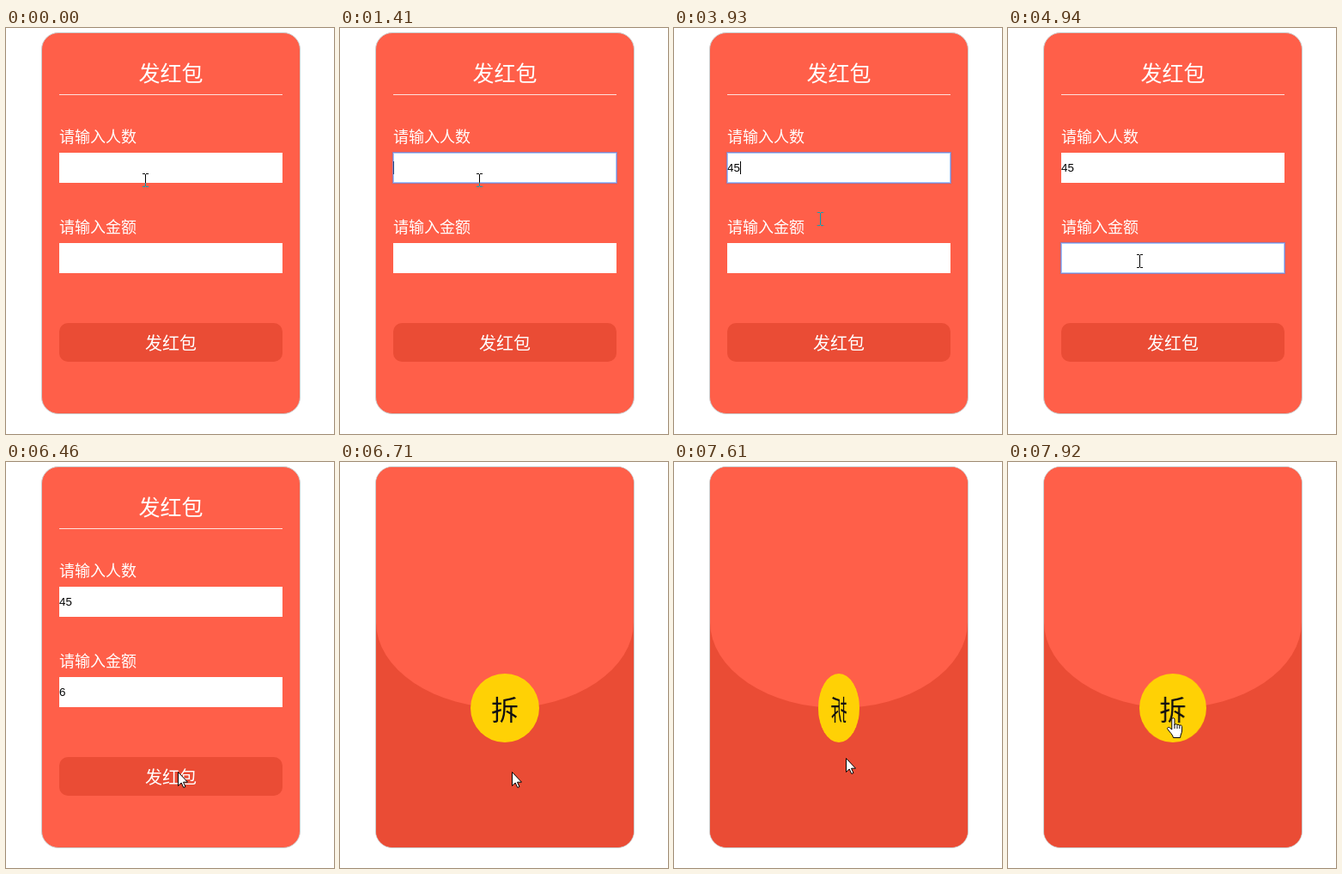
An HTML page for the animation above (8 s loop, 382x472 px).

```html
<!DOCTYPE html>
<html lang="zh-CN">
<head>
<meta charset="utf-8">
<title>发红包</title>
<style>
  :root { --red: #ff5f49; --dark: #ea4c35; }
  html, body { margin: 0; width: 100%; height: 100%; overflow: hidden; background: #fff; }
  .stage {
    position: relative; width: 382px; height: 472px; overflow: hidden; background: #fff;
    color: #fff; font-family: "Noto Sans CJK SC", "Noto Sans CJK", sans-serif;
  }
  .stage * { position: absolute; box-sizing: border-box; }
  .card {
    left: 41px; top: 5px; width: 302px; height: 444px; overflow: hidden;
    border: 1px solid #ccc; border-radius: 20px; background: var(--red);
  }
  .row { left: 20px; width: 260px; white-space: nowrap; }
  .title { top: 19px; height: 53px; border-bottom: 1px solid #ffe0dc; font-size: 25px; line-height: 52px; text-align: center; }
  .label { height: 30px; font-size: 18px; line-height: 30px; }
  .field { height: 35px; background: #fff; color: #000; font: 13.333px/35px "Liberation Sans", Arial, sans-serif; }
  .field span { position: static; }
  .button { top: 337px; height: 45px; border-radius: 10px; background: var(--dark); font-size: 20px; line-height: 45px; text-align: center; }
  .ring { inset: -1px; border: 1px solid rgba(77, 144, 254, .6); box-shadow: inset 0 0 0 1px rgba(77, 144, 254, .5); }
  .caret { left: 0; top: 10px; width: 1px; height: 15px; background: #000; }

  .envelope { inset: 0; background: var(--dark); }
  .flap { left: 0; top: 0; width: 300px; height: 280px; background: var(--red); border-radius: 0 0 150px 150px / 0 0 100px 100px; }
  .coin {
    left: 110px; top: 240px; width: 80px; height: 80px; border-radius: 50%;
    background: #ffd105; color: #111; font-size: 32px; line-height: 80px; text-align: center;
  }
  svg { left: 0; top: 0; overflow: visible; transform: translate(-99px, 0); }
  .pointer path { fill: #fff; stroke: #000; stroke-linejoin: round; }
  .beam { fill: #fff; mix-blend-mode: difference; }

  /* Every change is a hard step in one 8 s loop; 1% = 80 ms. */
  .anim { animation: var(--k) 8s step-end infinite; }
  .ring, .caret, .digit, .envelope { opacity: 0; }
  @keyframes ring1 { 17.625% { opacity: 1 } 54.375% { opacity: 0 } }
  @keyframes ring2 { 54.375% { opacity: 1 } 79.25% { opacity: 0 } }
  @keyframes caret1 {
    17.625% { opacity: 1; left: 0 }
    24.875% { opacity: 0 }
    31.875% { opacity: 1 }
    37.625% { opacity: 0 }
    44.25% { opacity: 1; left: 7px }
    47.625% { opacity: 1; left: 15px }
    54.375% { opacity: 0 }
  }
  @keyframes caret2 {
    54.375% { opacity: 1; left: 0 }
    61.75% { opacity: 0 }
    66.75% { opacity: 1; left: 7px }
    73.875% { opacity: 0 }
  }
  @keyframes type1 { 44.25%, 100% { opacity: 1 } }
  @keyframes type2 { 47.625%, 100% { opacity: 1 } }
  @keyframes type3 { 66.75%, 100% { opacity: 1 } }
  @keyframes open { 83.875%, 100% { opacity: 1 } }
  @keyframes spin {
    0%, 83.875% { transform: rotateY(0deg) }
    85.75% { transform: rotateY(53deg) }
    87.25% { transform: rotateY(112deg) }
    88.75% { transform: rotateY(143deg) }
    90.25% { transform: rotateY(167deg) }
    91.75% { transform: rotateY(177deg) }
    93.25% { transform: rotateY(192deg) }
    95.125% { transform: rotateY(233deg) }
    97.125% { transform: rotateY(306deg) }
    99%, 100% { transform: rotateY(347deg) }
  }
  @keyframes beam {
    0% { transform: translate(159px, 169px) }
    49.125% { transform: translate(167px, 214px) }
    50.625% { transform: translate(153px, 252px) }
    52.5% { transform: translate(150px, 263px) }
    68.25% { transform: translate(153px, 266px) }
    70.125%, 100% { transform: translate(-99px, 0) }
  }
  @keyframes arrow {
    70.125% { transform: translate(184px, 324px) }
    72% { transform: translate(200px, 350px) }
    73.875% { transform: translate(200px, 352px) }
    75.75% { transform: translate(194px, 360px) }
    77.375% { transform: translate(198px, 365px) }
    79.25% { transform: translate(200px, 362px) }
    80.75% { transform: translate(200px, 360px) }
    95.125% { transform: translate(200px, 344px) }
    97.125%, 100% { transform: translate(-99px, 0) }
  }
  @keyframes hand {
    97.125% { transform: translate(185px, 315px) }
    99%, 100% { transform: translate(185px, 297px) }
  }
</style>
</head>
<body>
<div class="stage">
  <div class="card">
    <div class="row title">发红包</div>
    <div class="row label" style="top:104px">请输入人数</div>
    <div class="row field" style="top:139px">
      <span class="digit anim" style="--k:type1">4</span><span class="digit anim" style="--k:type2">5</span>
      <i class="caret anim" style="--k:caret1"></i>
      <i class="ring anim" style="--k:ring1"></i>
    </div>
    <div class="row label" style="top:209px">请输入金额</div>
    <div class="row field" style="top:244px">
      <span class="digit anim" style="--k:type3">6</span>
      <i class="caret anim" style="--k:caret2"></i>
      <i class="ring anim" style="--k:ring2"></i>
    </div>
    <div class="row button">发红包</div>
    <div class="envelope anim" style="--k:open">
      <div class="flap"></div>
      <div class="coin anim" style="--k:spin">拆</div>
    </div>
  </div>
  <svg class="beam anim" style="--k:beam" width="7" height="16">
    <path d="M0 0h3v1h1V0h3v1H4v14h3v1H4v-1H3v1H0v-1h3V1H0z"/>
  </svg>
  <svg class="pointer anim" style="--k:arrow" width="12" height="19">
    <path d="M.5.5v16l3.7-3.5 2.6 5.5 2.2-1-2.5-5.3h5z"/>
  </svg>
  <svg class="pointer anim" style="--k:hand" width="19" height="24">
    <path d="M5.8 14V2.2a1.6 1.6 0 0 1 3.2 0V9c0-1.8 3-1.8 3 .2 0-1.4 2.9-1.3 2.9.6 0-1.3 2.7-1.1 2.7.8V15c0 3.2-1.7 4.6-2 8.5H7.5C7 20 3.2 17 .9 13.6c-1-1.9 1.3-2.9 2.7-1.5z"/>
    <path d="M9 9v4M12 9.500v3.500M14.900 10v3" fill="none"/>
  </svg>
</div>
</body>
</html>
```
